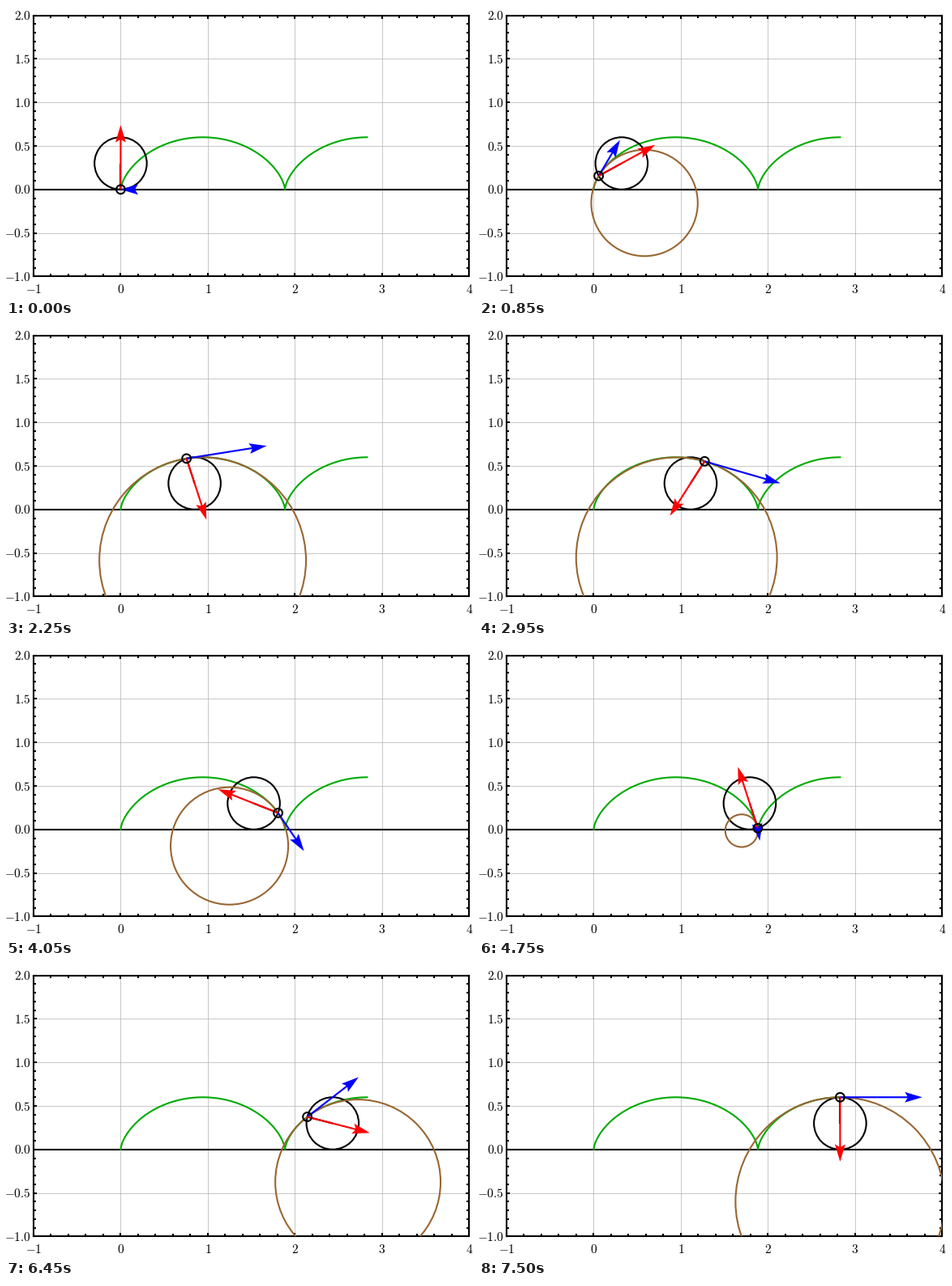
Animation of 576x361 px, one loop 7.55 s. Source, as a matplotlib script:

```python
import numpy as np
import matplotlib.pyplot as plt
from matplotlib.animation import FuncAnimation
from matplotlib.patches import Circle, Polygon
from matplotlib.ticker import MultipleLocator, NullFormatter

plt.rcParams["mathtext.fontset"] = "cm"

W, H, DPI = 576, 361, 100
LEFT, RIGHT, TOP, BOTTOM = 33.9, 571.45, 11.7, 334.33
FRAMES, INTERVAL = 151, 50
R = 0.3               # wheel radius
OMEGA = np.pi / 2     # angular speed
LW = 1.5

fig = plt.figure(figsize=(W / DPI, H / DPI), dpi=DPI, facecolor="white")
ax = fig.add_axes([LEFT / W, 1 - BOTTOM / H, (RIGHT - LEFT) / W, (BOTTOM - TOP) / H])
ax.set_xlim(-1, 4)
ax.set_ylim(-1, 2)


def style_axes():
    for axis, major, minor in ((ax.xaxis, 1, 0.2), (ax.yaxis, 0.5, 0.1)):
        axis.set_major_locator(MultipleLocator(major))
        axis.set_minor_locator(MultipleLocator(minor))
        axis.set_major_formatter(NullFormatter())
    ax.tick_params(which="both", direction="in", top=True, right=True, width=LW)
    ax.tick_params(which="major", length=3)
    ax.tick_params(which="minor", length=2)
    ax.grid(True, color="#b0b0b0", lw=0.5)
    ax.set_axisbelow(True)
    for spine in ax.spines.values():
        spine.set_linewidth(LW)


def label(x, y, text, ha):
    fig.text(x / W, 1 - y / H, f"${text}$", ha=ha, va="baseline", fontsize=11)


def add_labels():
    for x in range(-1, 5):
        label(LEFT + (x + 1) * (RIGHT - LEFT) / 5, 355, x, "center")
    for y in np.arange(-1, 2.1, 0.5):
        py = BOTTOM - (y + 1) * (BOTTOM - TOP) / 3
        label(31, py + 5.7, f"{y:.1f}", "right")


def cycloid(a):
    return np.array([R * (a - np.sin(a)), R * (1 - np.cos(a))])


def arrow_points(start, vec, width=0.02, head=0.2, head_width=0.12, notch=0.17):
    """Outline of an arrow with a fixed-size, notched head."""
    size = np.hypot(*vec)
    along = vec / size if size > 0 else np.array([-1.0, 0.0])
    side = np.array([-along[1], along[0]])
    tail = min(0, size - notch)
    w, hw = width / 2, head_width / 2
    outline = [(tail, w), (size - notch, w), (size - head, hw), (size, 0),
               (size - head, -hw), (size - notch, -w), (tail, -w)]
    return [start + u * along + v * side for u, v in outline]


def ring(radius, color, z):
    return ax.add_patch(Circle((0, 0), radius, fill=False, ec=color, lw=LW, zorder=z))


def arrow(color, z):
    return ax.add_patch(Polygon(np.zeros((7, 2)), fc=color, lw=0, zorder=z))


style_axes()
add_labels()
ax.axhline(0, color="black", lw=LW, zorder=2)
ax.plot(*cycloid(np.linspace(0, 3 * np.pi, 400)), color="#00aa00", lw=LW, zorder=3)

wheel = ring(R, "black", 4)
osculating = ring(0, "#996633", 5)
spoke, = ax.plot([], [], color="black", lw=LW, solid_capstyle="butt", zorder=6)
velocity = arrow("blue", 7)
acceleration = arrow("red", 8)
marker = ring(0.05, "black", 9)


def update(i):
    a = 3 * np.pi * i / (FRAMES - 1)
    s, c = np.sin(a), np.cos(a)
    p = cycloid(a)
    hub = (R * a, R)

    wheel.center = hub
    marker.center = p
    osculating.center = (R * (a + s), -R * (1 - c))
    osculating.set_radius(4 * R * abs(np.sin(a / 2)))
    osculating.set_visible(i > 0)
    spoke.set_data([p[0], hub[0]], [p[1], hub[1]])
    velocity.set_xy(arrow_points(p, R * OMEGA * np.array([1 - c, s])))
    acceleration.set_xy(arrow_points(p, R * OMEGA ** 2 * np.array([s, c])))
    return wheel, osculating, velocity, acceleration, spoke, marker


anim = FuncAnimation(fig, update, frames=FRAMES, interval=INTERVAL,
                     repeat=True, repeat_delay=0)
plt.show()
```
